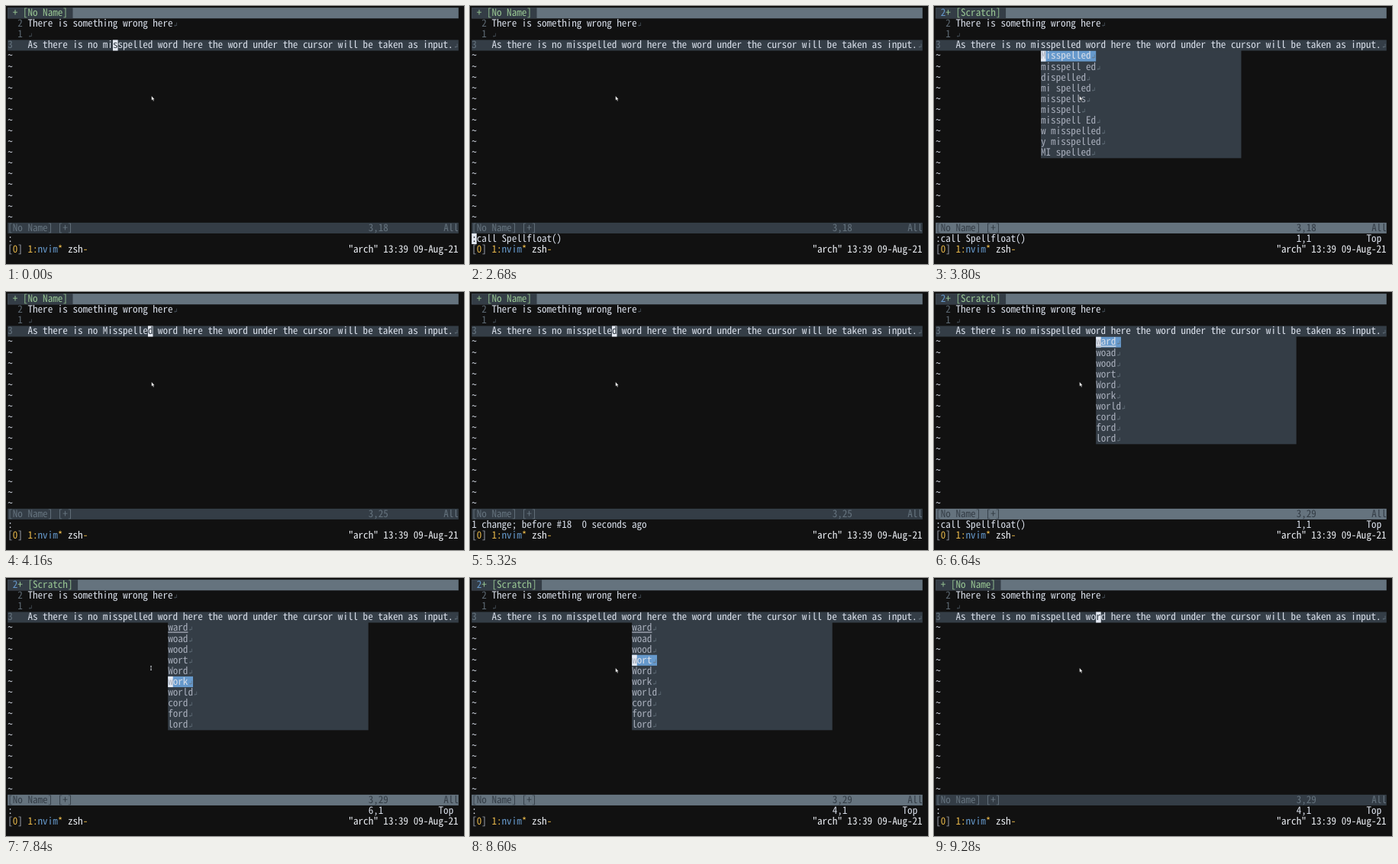
Write an HTML page that moves like this. It is 600x338 px and loops after 10 s.

```html
<!DOCTYPE html>
<html lang="en">
<head>
<meta charset="utf-8">
<title>Spell popup in a terminal</title>
<style>
  html, body { margin: 0; width: 100%; height: 100%; overflow: hidden; background: #111; }
  #screen { position: absolute; left: 0; top: 0; overflow: hidden; }
  #screen text { white-space: pre; font-variant-ligatures: none; text-rendering: geometricPrecision; }
</style>
</head>
<body>
<svg id="screen" width="600" height="338" viewBox="0 0 600 338"></svg>
<script>
const LOOP = 10000, CELL = 6.5625, ROW = 14.083, X0 = 2.19, Y0 = 2.19, BASE = 10.9, COLS = 90;
const FONT = '"Noto Sans Mono CJK JP", "Noto Sans Mono", "DejaVu Sans Mono", monospace';
const C = {
  text: '#d8dee9', dim: '#4f5b66', num: '#5c6872', bar: '#343d46', fill: '#65737e',
  soft: '#a7adba', blue: '#6699cc', green: '#99c794', yellow: '#e8b84a', white: '#eceff4',
  cursor: '#e4e9f2', dark: '#111111'
};
const LINE = 'As there is no misspelled word here the word under the cursor will be taken as input.';
const CALL = ':call Spellfloat()';
const UNDO = '1 change; before #18  0 seconds ago';
const LISTS = {
  misspelled: { col: 21, words: ['Misspelled', 'misspell ed', 'dispelled', 'mi spelled', 'misspells',
    'misspell', 'misspell Ed', 'w misspelled', 'y misspelled', 'MI spelled'] },
  word: { col: 32, underline: true, words: ['ward', 'woad', 'wood', 'wort', 'Word',
    'work', 'world', 'cord', 'ford', 'lord'] }
};

// Each step changes part of the state. `prompt` is the cursor column on the command line.
const steps = [
  [0, { line: LINE, at: 18, cmd: ':', prompt: null, list: null, pick: 1, ruler: null, beam: false }],
  [480, { beam: true }],
  [560, { prompt: 1 }],
  [640, { beam: false }],
  [1000, { cmd: CALL, prompt: 18 }],
  [2680, { prompt: 0 }],
  [2720, { prompt: null, list: 'misspelled', ruler: 1 }],
  [3840, { list: null, ruler: null, cmd: ':', at: 25, line: LINE.replace('miss', 'Miss') }],
  [4480, { line: LINE, at: 16, cmd: UNDO }],
  [4840, { at: 17 }],
  ...[18, 19, 20, 21, 22, 23, 24, 24, 25, 27, 29].map((at, i) => [5000 + i * 40, { at }]),
  [5680, { beam: true }],
  [5840, { cmd: ':', prompt: 1 }],
  [5960, { beam: false }],
  [6120, { cmd: CALL, prompt: 18 }],
  [6600, { prompt: 0 }],
  [6640, { prompt: null, list: 'word', pick: 1, ruler: 1 }],
  [7000, { cmd: ':', pick: 2, ruler: 2 }],
  ...[[7200, 3], [7280, 4], [7360, 5], [7640, 6]].map(([t, n]) => [t, { pick: n, ruler: n }]),
  [7840, { beam: true }],
  [8040, { beam: false }],
  ...[7, 8, 9, 8, 7, 6, 5, 4].map((n, i) => [8080 + i * 74, { pick: n, ruler: n }]),
  [9120, { list: null, at: 29 }]
];

const screen = document.getElementById('screen');
const x = col => X0 + col * CELL;
const y = row => Y0 + row * ROW;

// Font size at which one character fills one cell.
function cellFontSize() {
  const ctx = document.createElement('canvas').getContext('2d');
  ctx.font = '100px ' + FONT;
  return 100 * CELL / ctx.measureText('m').width;
}

function add(tag, attrs) {
  const el = document.createElementNS('http://www.w3.org/2000/svg', tag);
  for (const name in attrs) el.setAttribute(name, attrs[name]);
  screen.append(el);
  return el;
}

function put(row, col, text, fill = C.text, attrs = {}) {
  add('text', { x: x(col), y: y(row) + BASE, fill, ...attrs }).textContent = text;
}

function block(row, col, cols, fill, rows = 1) {
  add('rect', { x: x(col), y: y(row), width: cols * CELL, height: rows * ROW, fill });
}

function eol(row, col, color = C.dim) {
  put(row, col + 0.15, '↲', color, { 'font-size': 8 });
}

function cursor(row, col, char, color = C.bar) {
  block(row, col, 1, C.cursor);
  put(row, col, char, color);
}

function drawTabs(open) {
  block(0, 0, COLS, C.fill);
  block(0, 0, open ? 14 : 13, C.bar);
  if (open) put(0, 1, '2', C.blue);
  put(0, open ? 2 : 1, '+', C.green);
  put(0, open ? 4 : 3, open ? '[Scratch]' : '[No Name]', C.green);
}

function drawBuffer(s) {
  put(1, 2, '2', C.num);
  put(1, 4, 'There is something wrong here');
  eol(1, 33);
  put(2, 2, '1', C.num);
  eol(2, 4);
  block(3, 0, COLS, C.bar);
  put(3, 0, '3', C.fill);
  put(3, 4, s.line);
  eol(3, 4 + s.line.length, C.fill);
  for (let row = 4; row < 20; row++) put(row, 0, '~');
  if (!s.list && s.prompt === null) cursor(3, s.at + 3, s.line[s.at - 1]);
}

function drawList({ col, words, underline }, pick) {
  // Starts under the current line so that no seam shows between the two.
  block(3.5, col, 40, C.bar, 10.5);
  words.forEach((word, i) => {
    const row = 4 + i, on = i + 1 === pick;
    if (on) {
      block(row, col, word.length + 1, C.blue);
      block(row, col, 1, C.cursor);
    }
    const line = underline && i === 0 ? { 'text-decoration': 'underline' } : {};
    put(row, col, word[0], C.soft, line);
    put(row, col + 1, word.slice(1), on ? C.text : C.soft, line);
    eol(row, col + word.length, C.fill);
  });
}

function drawStatus(s) {
  const color = s.list ? C.bar : C.fill;
  block(20, 0, COLS, s.list ? C.fill : C.bar);
  put(20, 0, '[No Name] [+]', color);
  put(20, 72, '3,' + s.at, color);
  put(20, 87, 'All', color);
}

function drawCommand(s) {
  put(21, 0, s.cmd);
  if (s.prompt !== null) cursor(21, s.prompt, s.cmd[s.prompt] || ' ', C.dark);
  if (s.ruler) {
    put(21, 72, s.ruler + ',1');
    put(21, 86, 'Top');
  }
}

function drawSessions() {
  const parts = [['[', C.soft], ['0', C.yellow], ['] ', C.soft], ['1:', C.yellow],
    ['nvim', C.blue], ['*', C.yellow], [' zsh', C.white], ['-', C.yellow]];
  let col = 0;
  for (const [text, color] of parts) {
    put(22, col, text, color);
    col += text.length;
  }
  put(22, 68, '"arch" 13:39 09-Aug-21', C.white);
}

function drawMouse(beam) {
  if (beam) {
    add('path', { d: 'M189 115.5h2m-1 0v5m-1 0h2', fill: 'none', stroke: '#c8ccd2', 'stroke-width': 0.8 });
  } else {
    add('path', { d: 'M190.6 117.8v5.8l1.4-1 1 2.2 1-.5-.9-2h1.6z', fill: '#fff', stroke: '#111', 'stroke-width': 0.4 });
  }
}

function draw(s) {
  screen.replaceChildren();
  drawTabs(s.list);
  if (s.list) drawList(LISTS[s.list], s.pick);
  drawBuffer(s);
  drawStatus(s);
  drawCommand(s);
  drawSessions();
  drawMouse(s.beam);
}

let shown = -1;
function frame() {
  const now = performance.now() % LOOP;
  const count = steps.filter(([t]) => t <= now).length;
  if (count !== shown) {
    shown = count;
    draw(Object.assign({}, ...steps.slice(0, count).map(([, change]) => change)));
  }
  requestAnimationFrame(frame);
}

screen.style.fontFamily = FONT;
screen.style.fontSize = cellFontSize() + 'px';
frame();
</script>
</body>
</html>
```
